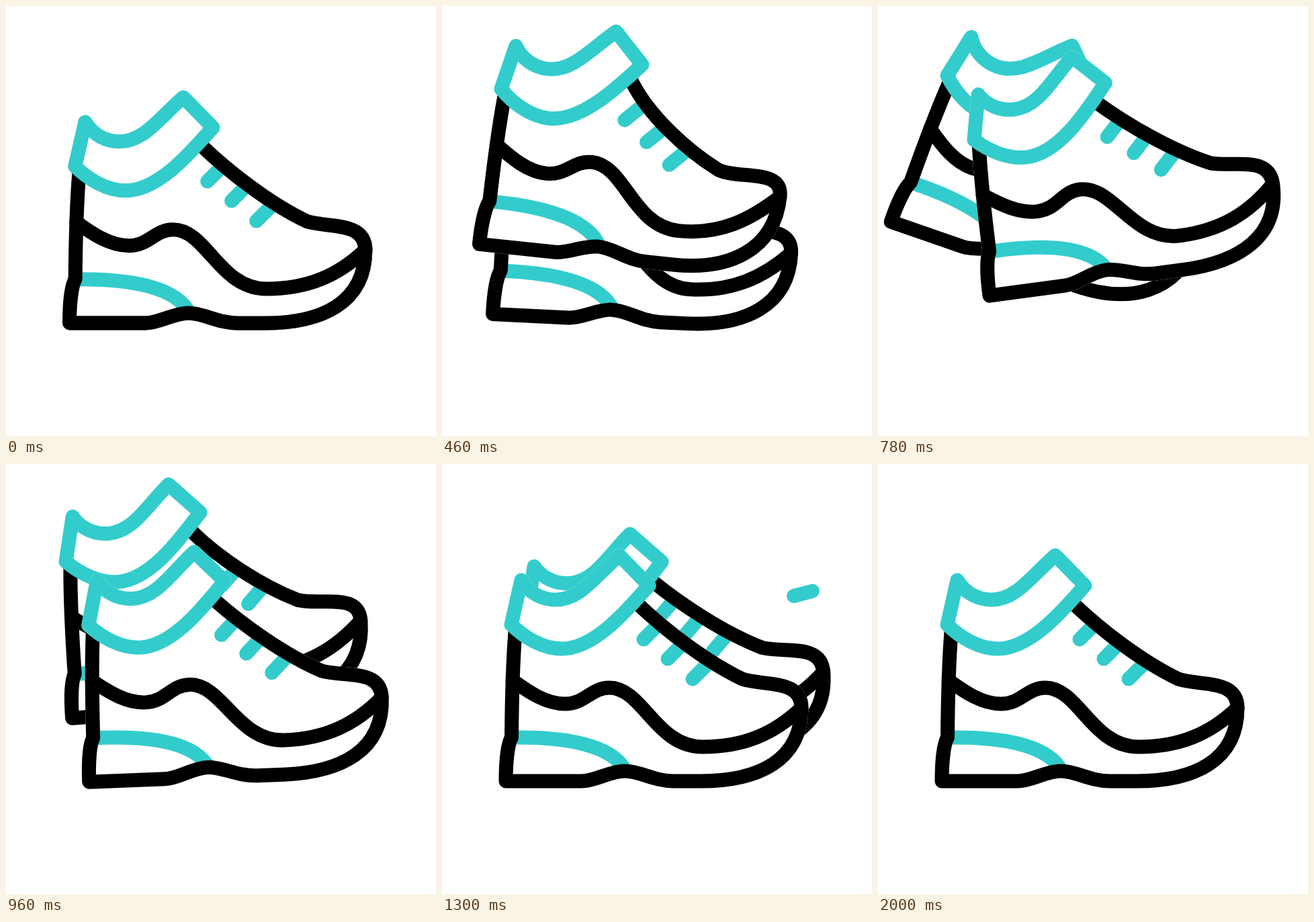
An HTML page with a canvas that plays this animation: 640x640 px, repeating every 2400 ms.

```html
<!DOCTYPE html>
<html lang="en">
<head>
<meta charset="utf-8">
<title>Walking shoes</title>
<style>
html, body { margin: 0; width: 100%; height: 100%; overflow: hidden; background: #fff; }
canvas { display: block; width: 640px; height: 640px; }
</style>
</head>
<body>
<canvas id="stage" width="640" height="640"></canvas>
<script>
const ctx = document.getElementById('stage').getContext('2d');
const LOOP = 2400, LINE = 21, TEAL = '#33cccc', BLACK = '#000', WHITE = '#fff';
const PIVOT = [320, 305];
const STEP_MS = 1040, BACK_DELAY = 420;

const back = 'M109 250 C105 300 104 350 103.5 407 ';
const sole = 'C97 418 95 450 95 472 L208 472 C228 472 250 457 272 457 ' +
  'C295 457 315 472 345 472 L385 472 ';
const rim = 'M118 173 C130 193 150 202 169 202 C206 202 228 167 264 136 L308 181 ';
const collar = new Path2D(rim + 'C285 205 232 275 178 275 C150 275 122 258 103 239 Z');
const heel = new Path2D('M106 407 C187 406 253 419 273 456');
const wave = 'M105 322 C130 340 155 357 183 357 C213 357 222 333 249 333 ' +
  'C299 333 318 421 388 421 ';

// When the shoe flexes, the instep sinks back and the toe lifts
function makeShoe(flex) {
  const shift = (dx, dy) => (x, y) => `${x + dx * flex} ${y + dy * flex} `;
  const step = shift(-11.5, 5.8), toe = shift(-3, -10), top = shift(6, 0);
  const front = 'C470 472 ' + toe(535, 442) + toe(535, 363) +
    'C' + toe(535, 320) + step(481, 331) + step(447, 320) +
    'C' + step(395, 295) + step(335, 250) + top(290, 207);
  const lace = (x, y) => 'M' + step(x, y) + 'l22 -22 ';
  return {
    outline: new Path2D(back + sole + front),
    stripe: new Path2D(wave + 'C450 421 ' + toe(495, 401) + toe(535, 363)),
    laces: new Path2D(lace(300, 261) + lace(336, 290) + lace(373, 320))
  };
}

// One step: time, pivot x, pivot y, tilt in degrees, flex
const frontStep = [
  [0, 320, 305, 0, 0], [40, 308.6, 302.8, 2.7, 0.3], [180, 288.5, 280, 15, 1],
  [280, 282, 258, 20.5, 1], [360, 286.4, 237.3, 19.2, 1], [460, 296.7, 212.3, 6.2, 0.82],
  [540, 310.2, 195, -4.2, 0.35], [600, 328, 188.5, -7.6, 0.05], [660, 347, 197, -9, 0],
  [780, 366.8, 235.5, -7.65, 0], [880, 350, 268, -4.5, 0], [960, 342.4, 297.5, -2.2, 0],
  [STEP_MS, 320, 305, 0, 0]
];
// The far shoe swings forward a little less
const backStep = frontStep.map(k => k.slice());
backStep[8][1] = 344;
backStep[9][1] = 357;
backStep[10][1] = 348.8;

function slope(keys, i, c) {
  const a = keys[Math.max(i - 1, 0)], b = keys[Math.min(i + 1, keys.length - 1)];
  return (b[c] - a[c]) / (b[0] - a[0]);
}

function poseAt(keys, t) {
  t = Math.min(Math.max(t, 0), STEP_MS);
  let i = 0;
  while (i < keys.length - 2 && t > keys[i + 1][0]) i++;
  const a = keys[i], b = keys[i + 1], span = b[0] - a[0], u = (t - a[0]) / span;
  const u2 = u * u, u3 = u2 * u;
  return [1, 2, 3, 4].map(c =>
    (2 * u3 - 3 * u2 + 1) * a[c] + (3 * u2 - 2 * u3) * b[c] +
    span * ((u3 - 2 * u2 + u) * slope(keys, i, c) + (u3 - u2) * slope(keys, i + 1, c)));
}

function stroke(path, color) {
  ctx.strokeStyle = color;
  ctx.stroke(path);
}

function drawShoe([x, y, tilt, flex]) {
  const shoe = makeShoe(flex);
  ctx.save();
  ctx.translate(x, y);
  ctx.rotate(tilt * Math.PI / 180);
  ctx.translate(-PIVOT[0], -PIVOT[1]);
  ctx.fillStyle = WHITE;
  for (const p of [shoe.outline, collar]) {
    ctx.fill(p);
    stroke(p, WHITE);
  }
  stroke(shoe.laces, TEAL);
  stroke(heel, TEAL);
  stroke(shoe.stripe, BLACK);
  stroke(shoe.outline, BLACK);
  ctx.fill(collar);
  stroke(collar, TEAL);
  ctx.restore();
}

// Dashes run inwards, one after another
const DASH = { x: 421, y: 224, inner: 78, outer: 135, start: 1200, gap: 200, half: 200 };
const clamp = v => Math.min(Math.max(v, 0), 1);

function drawDash(n, t) {
  const u = (t - DASH.start - n * DASH.gap) / DASH.half;
  if (u <= 0 || u >= 2) return;
  const len = DASH.outer - DASH.inner;
  const r1 = DASH.outer - len * clamp(u), r2 = DASH.outer - len * clamp(u - 1);
  const angle = -(15 + 30 * n) * Math.PI / 180;
  const cos = Math.cos(angle), sin = Math.sin(angle);
  ctx.strokeStyle = TEAL;
  ctx.beginPath();
  ctx.moveTo(DASH.x + r1 * cos, DASH.y + r1 * sin);
  ctx.lineTo(DASH.x + r2 * cos, DASH.y + r2 * sin);
  ctx.stroke();
}

function draw(t) {
  ctx.fillStyle = WHITE;
  ctx.fillRect(0, 0, 640, 640);
  ctx.lineWidth = LINE;
  ctx.lineCap = ctx.lineJoin = 'round';
  if (t > 0 && t < BACK_DELAY + STEP_MS) drawShoe(poseAt(backStep, t - BACK_DELAY));
  drawShoe(poseAt(frontStep, t));
  for (let n = 0; n < 3; n++) drawDash(n, t);
}

const begin = performance.now();
function tick() {
  draw((performance.now() - begin) % LOOP);
  requestAnimationFrame(tick);
}
tick();
</script>
</body>
</html>
```
